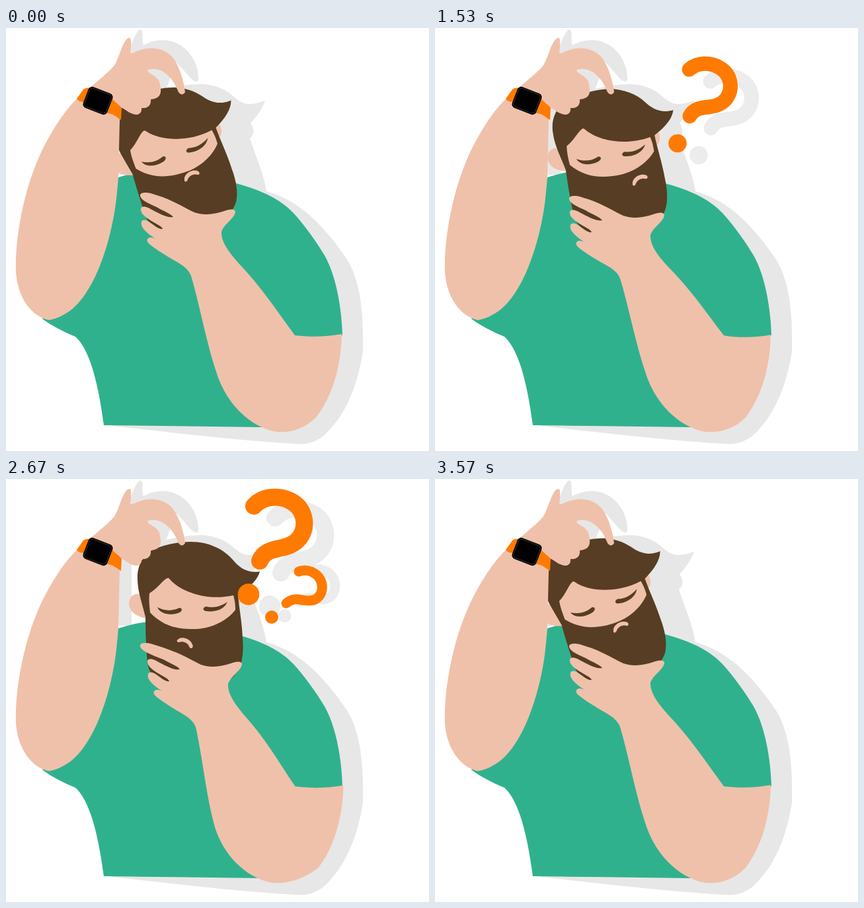
Animation, 640 px wide and 640 px high, one loop 3600 ms. Source, as an HTML page:

```html
<!DOCTYPE html>
<html lang="en">
<head>
<meta charset="utf-8">
<title>Thinking man</title>
<style>
  html, body { margin: 0; width: 100%; height: 100%; overflow: hidden; background: #fff; }
  svg { display: block; width: 100vw; height: 100vh; }
  .shade { fill: #e7e7e7; }
  .skin { fill: #efc1ab; }
  .hair { fill: #573d23; }
  .shirt { fill: #30b18e; }
  .orange { fill: #ff7a00; }
  .mark { fill: currentColor; }
  .mark path { fill: none; stroke: currentColor; stroke-linecap: round; }
</style>
</head>
<body>
<svg viewBox="0 0 640 640">
  <defs>
    <g id="big" class="mark">
      <path stroke-width="26" d="M375,41 C388,26 412,24 430,33 C452,44 457,70 445,88 C428,112 394,98 384,124"/>
      <circle cx="367" cy="174.5" r="16.3"/>
    </g>
    <g id="small" class="mark">
      <path stroke-width="15" d="M443,140 C455,135 470,141 476,153 C481,165 478,178 466,183 C450,188 440,175 424,188"/>
      <circle cx="402" cy="209" r="10"/>
    </g>
  </defs>

  <g class="shade">
    <path d="M160,60 L186,40 C190,20 198,4 203,2 C209,3 205,18 208,26 C225,17 245,15 262,25 C282,36 292,60 291,78 C289,84 282,80 276,72 L258,52 L240,98 L190,130 V222 H160Z"/>
    <path d="M215,215 V100 C245,90 270,85 297,85 C315,86 328,91 340,100 C350,109 358,115 368,115 C378,115 384,112 392,110 C388,122 379,134 370,144 C376,153 376,161 369,167 C378,195 390,220 394,247 C440,260 470,290 498,325 C510,342 518,350 525,368 C538,400 541,440 540,490 C532,540 515,580 492,605 C480,620 462,632 440,629 C360,625 260,613 160,602 L300,400Z"/>
  </g>
  <g transform="translate(32 18)" color="#ececec"><use class="q1" href="#big"/></g>
  <g transform="translate(19.5 -2)" color="#ececec"><use class="q2" href="#small"/></g>

  <path class="shirt" d="M170,226 C180,223 195,218 215,216 L345,234 C372,242 408,252 435,280 C453,300 468,321 482,344 C500,376 508,425 509,465 L437,480 L388,604 L148,601 C141,550 130,490 105,467 C88,460 70,451 55,440Z"/>

  <g id="head">
    <path class="skin" d="M211,176 C198,170 187,172 186,188 C188,203 200,207 213,210Z"/>
    <ellipse class="skin" cx="351" cy="176" rx="7.5" ry="12"/>
    <path class="hair" d="M199,150 C198,128 210,112 222,106 C240,98 262,94 280,94 C308,94 330,106 343,121 C352,132 364,142 384,139 C381,151 370,162 351,173 C352,190 357,215 358,240 C360,262 357,280 350,291 C340,305 320,318 290,318 L247,311 C230,306 217,297 214,277 C212,255 211,230 211,208 C207,190 199,170 199,150Z"/>
    <path class="skin" d="M244,149 C237,152 230,164 217,172 C216,182 217,191 218,201 C235,219 255,226 280,226 C310,227 335,213 347,197 C347,188 346,182 344,175 C305,184 265,170 248,151 Q246,148 244,149Z"/>
    <path class="hair" d="M229,193 C240,199 252,199 262,194 C268,194 267,200 260,202 C248,206 233,203 229,193Z"/>
    <path class="hair" d="M335,185 C326,191 315,195 303,192 C297,193 297,199 304,199 C318,201 331,195 335,185Z"/>
  </g>
  <path id="mouth" class="skin" d="M-12,6 C-11,-3 4,-8 12,-1 C14,3 11,5 8,3 C2,0 -5,3 -8,8 C-10,10 -13,9 -12,6Z"/>

  <path class="skin" d="M186,15 C190,14 190,22 188,38 C192,38 195,37 198,35 C215,28 235,28 250,42 C262,55 269,80 271,97 C268,102 264,101 261,97 C257,88 254,80 245,72 C238,65 228,60 215,63 Q213,65 217,68 C224,72 233,77 233,86 C236,98 234,107 219,108 C220,117 214,122 205,121 C206,129 200,133 192,130 C185,128 179,122 174,120 L172,140 L170,226 C168,250 166,270 163,285 C153,340 131,401 98,427 C88,434 77,440 65,442 C40,437 18,410 15,370 C13,310 30,240 50,195 C68,155 92,120 110,105 C130,87 152,70 163,58 C172,45 176,18 186,15Z"/>
  <g class="orange">
    <path d="M107,107 L117,93 C122,90 126,90 130,92 L122,113 C116,111 111,113 107,107Z"/>
    <path d="M160,106 C166,114 172,116 175,121 L174,139 C167,135 162,129 153,129Z"/>
  </g>
  <g transform="translate(139 110) rotate(21)">
    <rect x="-19.5" y="-17" width="39" height="34" rx="6"/>
    <rect x="-17.5" y="-15" width="35" height="30" rx="4.5" fill="none" stroke="#555" stroke-width=".6"/>
  </g>

  <path id="forearm" class="skin"/>
  <g color="#ff7a00"><use class="q1" href="#big"/><use class="q2" href="#small"/></g>
</svg>
<script>
const LOOP = 3600;

const FOREARM = `M203,252 C205,248 215,248 225,252 C250,259 270,272 285,279 C300,284 315,282 330,277
  C338,274 347,273 347,279 C344,290 330,296 326,308 C325,325 340,342 352,356 C385,390 410,428 437,465
  C462,468 487,467 508,463 C507,510 495,555 470,588 C450,610 420,615 400,609 C360,597 330,560 318,520
  C303,475 292,415 280,375 C275,362 262,356 250,349 C237,341 222,332 215,325 C211,319 216,314 226,319
  C212,309 203,302 205,293 C207,288 214,291 219,295 C226,300 232,305 237,304 C236,300 228,297 222,293
  C212,287 203,281 204,273 C206,268 214,271 219,274 C232,281 245,288 253,286 C250,281 238,277 228,271
  C215,265 202,260 203,252Z`;

const clamp = (v, low, high) => Math.max(low, Math.min(high, v));
const progress = (t, from, to) => clamp((t - from) / (to - from), 0, 1);
const arc = (t, from, to) => Math.sin(Math.PI * progress(t, from, to));
const step = (t, from, to) => {
  const p = progress(t, from, to);
  return p < .5 ? 4 * p ** 3 : 1 - 4 * (1 - p) ** 3;
};
const place = (selector, transform) =>
  document.querySelectorAll(selector).forEach(el => el.setAttribute('transform', transform));

// The hand moves fully, the elbow swings slightly against it
function forearm(hx, hy, fingerX, fingerY) {
  return FOREARM.replace(/(\d+),(\d+)/g, (_, x, y) => {
    x = +x; y = +y;
    const w = x > 450 ? .25 : clamp((470 - y) / 130, -.6, 1);
    const finger = x < 230 && y < 266 ? 1 : 0;
    return `${x + w * hx + finger * fingerX},${y + Math.max(w, 0) * hy + finger * fingerY}`;
  });
}

// A mark unwinds out of its dot, may swell, and winds back in
function question(selector, t, x, y, { start, rise, end, swell }) {
  const size = step(t, start, start + rise) - step(t, end, end + 220);
  const extra = swell * arc(t, start, start + 540);
  const angle = 36 * (1 - size) + 66 * extra;
  place(selector, `translate(${x} ${y}) rotate(${angle}) scale(${size * (1 + extra)}) translate(${-x} ${-y})`);
}

function draw(t) {
  const back = 1 - step(t, 3240, 3600);
  const wake = back * step(t, 0, 550);
  const drift = back * step(t, 550, 1650);
  const turn = back * step(t, 1650, 2190);
  const rest = back * step(t, 2700, 3240);
  const nod = arc(t, 1500, 2240);

  const headX = 207 + 11 * wake + 4 * drift + 21 * turn;
  const headY = 156 - 5 * wake + drift - 2 * turn + 4 * nod - 2 * arc(t, 2700, 3600);
  const headAngle = -15.2 + 6.5 * wake + 1.2 * drift + 7.5 * turn;
  place('#head', `translate(${headX} ${headY}) rotate(${headAngle}) translate(-243 -149)`);

  const mouthX = 280 + 22 * wake + 7 * drift - 36 * turn + 18 * rest;
  const mouthY = 221 + 5 * drift + 20 * turn - 16.5 * rest + 9 * nod;
  place('#mouth', `translate(${mouthX} ${mouthY}) rotate(${-15 + 55 * turn - 27 * rest})`);

  const handX = 5 * (drift - wake) + 10 * turn - 6 * rest;
  const handY = 6 * wake - drift - 3 * turn - 2 * rest;
  document.querySelector('#forearm')
    .setAttribute('d', forearm(handX, handY, 5 * rest - 10 * turn, -3 * turn));

  question('.q1', t, 367, 174.5, { start: 1200, rise: 500, end: 2800, swell: 0 });
  question('.q2', t, 402, 209, { start: 1650, rise: 220, end: 3342, swell: .18 });
}

const begin = performance.now();
function frame() {
  draw((performance.now() - begin) % LOOP);
  requestAnimationFrame(frame);
}
frame();
</script>
</body>
</html>
```
